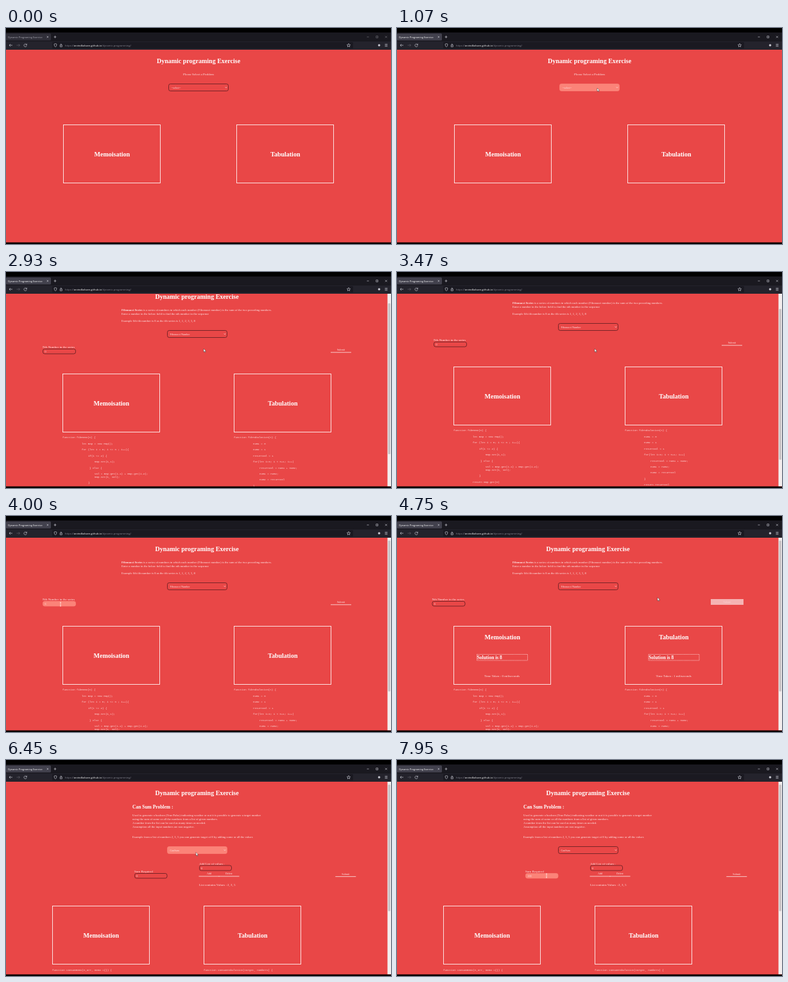
An HTML page that plays this animation: 600 px wide and 338 px high, repeating every 8 s.

```html
<!DOCTYPE html>
<html lang="en">
<head>
<meta charset="utf-8">
<title>Dynamic Programing Exercise</title>
<style>
  html, body { margin: 0; width: 100%; height: 100%; overflow: hidden; background: #000; }
  svg { display: block; width: 100vw; height: 100vh; }
  text { fill: #fde6e6; font: 5px "Liberation Serif", serif; }
  .h1, .h2 { fill: #fff; font-size: 10px; font-weight: bold; }
  .h2 { font-size: 7.5px; }
  .para { font-size: 4.7px; }
  .mid { text-anchor: middle; }
  .ctl { font-size: 4.17px; }
  .code { fill: #fbdada; font: 4.08px "Liberation Mono", monospace; }
  .ui { font: 4.05px "Open Sans", sans-serif; }
  .tab { font-size: 3.9px; }
  .dim { fill: #85848f; }
  .card { fill: none; stroke: #fdeaea; stroke-width: .94; }
  .field { fill: #e94747; stroke: #541a1e; stroke-width: .75; }
  .field.lit { fill: #fb8378; stroke: #fb8378; }
  .line { fill: none; stroke: #fdeaea; stroke-width: .8; }
  .icon { fill: none; stroke: #d0d0d8; stroke-width: .65; }
</style>
</head>
<body>
<svg viewBox="0 0 600 338" preserveAspectRatio="none">
  <defs><clipPath id="view"><rect y="34" width="600" height="301.5"/></clipPath></defs>
  <rect width="600" height="338"/>
  <rect y="34" width="600" height="301.5" fill="#e94747"/>
  <g clip-path="url(#view)">
    <g id="home"></g>
    <g id="fib"></g>
    <g id="sum"></g>
    <g id="bar">
      <rect x="594.5" y="34" width="5.5" height="301.5" fill="#f3eeee"/>
      <rect id="thumb" x="595.5" width="3.5" rx="1" fill="#c9c4c6"/>
    </g>
  </g>
  <g id="chrome"></g>
  <path id="arrow" d="M0 0V5.2L1.3 4.1 2.2 6 3 5.6 2.1 3.8H3.7Z" fill="#fff" stroke="#222" stroke-width=".4"/>
  <path id="beam" d="M-1 -3H1M0 -3V3M-1 3H1" stroke="#fff" stroke-width=".6" fill="none"/>
</svg>
<script>
const LOOP = 8000;
const $ = id => document.getElementById(id);
const escape = s => s.replace(/&/g, '&amp;').replace(/</g, '&lt;');
const text = (x, y, s, cls = '', id = '') =>
  `<text x="${x}" y="${y}" class="${cls}" id="${id}">${escape(s)}</text>`;
const lines = (x, y, step, list, cls) =>
  list.map((s, i) => text(x, y + i * step, s, cls)).join('');
const path = (d, cls = 'line') => `<path d="${d}" class="${cls}"/>`;
const field = (x, y, w, h, id) =>
  `<rect id="${id}" x="${x}" y="${y}" width="${w}" height="${h}" rx="2.8" class="field"/>`;
const select = (x, y, label, id) => field(x, y, 93, 11, id) +
  text(x + 4, y + 7, label, 'ctl') + path(`M${x + 88.3} ${y + 4.9}l1.2 1.2 1.2 -1.2`);
const card = (x, y) => `<rect x="${x}" y="${y}" width="151" height="91" class="card"/>`;
const button = (x, y, label) =>
  text(x, y, label, 'ctl mid') + path(`M${x - 16} ${y + 2.8}h32`);
const code = (x, y, rows) =>
  rows.map(([dx, dy, s]) => text(x + dx, y + dy, s, 'code')).join('');
const heading = x => text(x, 54.8, 'Dynamic programing Exercise', 'h1 mid');
const cards = (xs, y, cls = '') => xs.map((x, i) => card(x, y) +
  text(x + 75.8, y + 49, ['Memoisation', 'Tabulation'][i], 'h1 mid ' + cls)).join('');

$('chrome').innerHTML = `
  <rect y="7" width="600" height="13.5" fill="#1a1920"/>
  <rect id="tab" y="8.5" width="70" height="11" rx="1.5"/>
  <rect y="20.5" width="600" height="13.5" fill="#24232c"/>
  <rect x="72" y="22" width="469" height="10" rx="1.5" fill="#1a1921"/>` +
  text(3, 15.6, 'Dynamic Programing Exercise', 'ui tab', 'tabText') +
  path('M63.6 12.8l2.4 2.4m0 -2.4l-2.4 2.4M74.5 14h4M76.5 12v4', 'icon') +
  `<g id="winIcons">${path('M562.5 14h3M576.8 12.6h2.8v2.8h-2.8ZM591 12.6l2.8 2.8m0 -2.8l-2.8 2.8', 'icon')}</g>` +
  path('M10 27H5M7 25l-2 2 2 2M32 26a2.2 2.2 0 1 0 .3 1.6M32.4 24.6v1.8h-1.8', 'icon') +
  `<g opacity=".35">${path('M16.5 27h5M19.5 25l2 2 -2 2', 'icon')}</g>` +
  path('M75 25.2l2 -.7 2 .7q0 3.5 -2 4.5q-2 -1 -2 -4.5ZM84.3 26.8h3v2.6h-3ZM84.9 26.6v-1q.9 -1.6 1.8 0v1', 'icon') +
  `<text x="92" y="28.6" class="ui dim">https://<tspan fill="#fff">arvindkolsare.github.io</tspan>/dynamic-programming/</text>` +
  path('M534 24.4l.8 1.7 1.9 .2 -1.4 1.3 .4 1.9 -1.7 -1 -1.7 1 .4 -1.9 -1.4 -1.3 1.9 -.2ZM590.5 25.3h4M590.5 27h4M590.5 28.7h4', 'icon') +
  '<circle cx="581.5" cy="27" r="1.8" fill="#c4c4cc"/>';

$('home').innerHTML = heading(300) +
  text(300, 73.8, 'Please Select a Problem', 'mid') +
  select(253.5, 87.5, '--select--', 'homeSelect') + cards([89.5, 359.5], 151.5);

const result = (x, ms) => `
  <rect x="${x - 39}" y="216.5" width="79" height="9.5" class="line" style="stroke-width:.6" stroke-dasharray="1.5 .7"/>` +
  text(x - 38.8, 223.8, 'Solution is 8', 'h2') +
  text(x, 251.8, `Time Taken : ${ms} miliseconds`, 'mid');

$('fib').innerHTML = heading(297.5) +
  `<text x="180" y="73.8" class="para"><tspan font-weight="bold">Fibonacci Series</tspan> is a series of numbers in which each number (Fibonacci number) is the sum of the two preceding numbers.</text>` +
  text(180, 80, 'Enter a number in the below field to find the nth number in the sequence', 'para') +
  text(180, 91, 'Example 6th fib number is 8 as the fib series is 1, 1, 2, 3, 5, 8', 'para') +
  select(251.5, 104.5, 'Fibonacci Number', 'fibSelect') +
  `<g id="nth">${text(54.5, 132.2, 'Nth Number in the series') +
    field(55, 133.5, 51, 7.5, 'nthField') + text(58, 138.8, '0', 'ctl', 'nthValue')}</g>` +
  `<g id="submit">${button(522, 136, 'Submit')}</g>
   <g id="submitLit"><rect x="489" y="130" width="51" height="9" fill="#f5b3b3"/>
   <text x="514.5" y="136" class="ctl mid" style="fill:#fbd3d3">Submit</text></g>` +
  cards([88.5, 355.5], 172.5, 'fibTitle') +
  `<g id="results">${result(163.5, 0) + result(431, 1)}</g>` +
  code(88, 273, [
    [0, 0, 'function fibMemo(n) {'], [30, 9.7, 'let map = new Map();'],
    [30, 19, 'for (let i = 0; i <= n ; i++){'], [40, 28.6, 'if(i <= 2) {'],
    [50, 38, 'map.set(i,1);'], [42, 47.5, '} else {'],
    [50, 57, 'val = map.get(i-1) + map.get(i-2);'], [50, 61.7, 'map.set(i, val);'],
    [40, 71, '}'], [30, 80.5, 'return map.get(n)'], [0, 90, '}']]) +
  code(355, 273, [
    [0, 0, 'function fibTabulation(n) {'], [30, 9.7, 'num1 = 0'], [30, 19, 'num2 = 1'],
    [30, 28.6, 'returnVal = 1'], [30, 38, 'for(let i=3; i < n+1; i++)'],
    [40, 47.5, 'returnVal = num1 + num2;'], [40, 57, 'num1 = num2;'],
    [40, 66.4, 'num2 = returnVal'], [30, 76, '}'], [30, 85, 'return returnVal'], [0, 94, '}']]);

$('sum').innerHTML = heading(297.5) +
  text(197, 75.8, 'Can Sum Problem :', 'h2') +
  lines(197, 88.2, 6, [
    'Used to generate a boolean (True/False) indicating weather or not it is possible to generate a target number',
    'using the sum of some or all the numbers from a list of given numbers.',
    'A number from the list can be used as many times as needed.',
    'Assumption all the input numbers are non negative.'], 'para') +
  text(197, 122.2, 'Example from a list of numbers 2, 3, 5 you can generate target of 8 by adding some or all the values', 'para') +
  select(251.5, 135.5, 'CanSum', 'sumSelect') +
  text(200, 175.8, 'Sum Required') + field(200.5, 177.5, 50.5, 7.5, 'sumField') +
  text(203.3, 182.8, '0', 'ctl', 'sumValue') +
  text(301, 163.5, 'Add List of values :') + field(301.5, 165, 50, 8, 'listField') +
  text(304, 170.6, '0', 'ctl') +
  button(316.5, 179.2, 'Add') + button(347.5, 179.2, 'Delete') +
  text(301, 197, 'List contains Values : 2, 3, 5') +
  button(529.3, 179.6, 'Submit') + cards([72.5, 308.5], 228.5) +
  text(72, 329.7, 'function canSumMemo(n,arr, memo ={}) {', 'code') +
  text(308, 329.7, 'function canSumTabulation(target, numbers) {', 'code');

// Keys are [time, ...values]; each stretch is eased in and out.
function track(keys, t) {
  const next = keys.findIndex(k => k[0] > t);
  if (next < 0) return keys[keys.length - 1].slice(1);
  if (next === 0) return keys[0].slice(1);
  const a = keys[next - 1], b = keys[next];
  const p = (t - a[0]) / (b[0] - a[0]), e = p * p * (3 - 2 * p);
  return a.slice(1).map((v, i) => v + (b[i + 1] - v) * e);
}

const pointer = [
  [450, 420, 40], [1050, 312, 94], [1500, 310, 94], [1900, 307, 115], [2300, 307, 115],
  [2700, 308, 120], [3480, 308, 120], [3780, 85, 138], [4020, 85, 138], [4300, 520, 133],
  [4500, 520, 133], [4750, 406, 127.5], [5000, 300, 109], [5300, 298, 109],
  [5700, 296, 144.5], [6600, 296, 144.5], [7200, 233, 181]];
const scroll = [[2780, 0], [2920, 13], [2940, 13], [3130, 52], [3260, 52], [3460, 24], [3480, 24], [3640, 0]];

const show = (id, on) => { $(id).style.display = on ? '' : 'none'; };
const light = (id, on) => $(id).classList.toggle('lit', on);
const move = (id, x, y) => $(id).setAttribute('transform', `translate(${x} ${y})`);

function draw(t) {
  const during = (a, b) => t >= a && t < b;
  const active = t >= 400, solved = t >= 4350;
  const inFib = during(2300, 5950), inSum = t >= 5950;

  $('tab').setAttribute('fill', active ? '#42414d' : '#302f39');
  $('tabText').style.fill = active ? '#fff' : '#aaa9b3';
  $('winIcons').setAttribute('opacity', active ? 1 : .5);

  show('home', t < 2300);
  show('fib', inFib);
  show('sum', inSum);
  show('bar', t >= 2300);

  const [y] = track(scroll, t);
  move('fib', 0, -y);
  $('thumb').setAttribute('y', 38.5 + y * .8);
  $('thumb').setAttribute('height', inSum ? 198 : 236);

  light('homeSelect', during(1000, 2300));
  light('fibSelect', t >= 4950);
  light('sumSelect', t < 6720);
  light('nthField', during(3750, 4080));
  light('sumField', t >= 7150);
  $('nthValue').textContent = t < 3980 ? '0' : '6';
  $('sumValue').textContent = t < 7600 ? '0' : '100';

  move('nth', solved ? 0 : 2.5, 0);
  show('submit', !during(4250, 4950));
  show('submitLit', during(4250, 4950));
  show('results', solved);
  document.querySelectorAll('.fibTitle').forEach(el => el.setAttribute('y', solved ? 192.6 : 221.5));

  const [px, py] = track(pointer, t);
  const typing = during(3750, 4080) || t >= 7150;
  move('arrow', px, py);
  move('beam', px, py);
  show('arrow', t >= 450 && !typing);
  show('beam', typing);
}

const start = performance.now();
function frame() {
  draw((performance.now() - start) % LOOP);
  requestAnimationFrame(frame);
}
frame();
</script>
</body>
</html>
```
